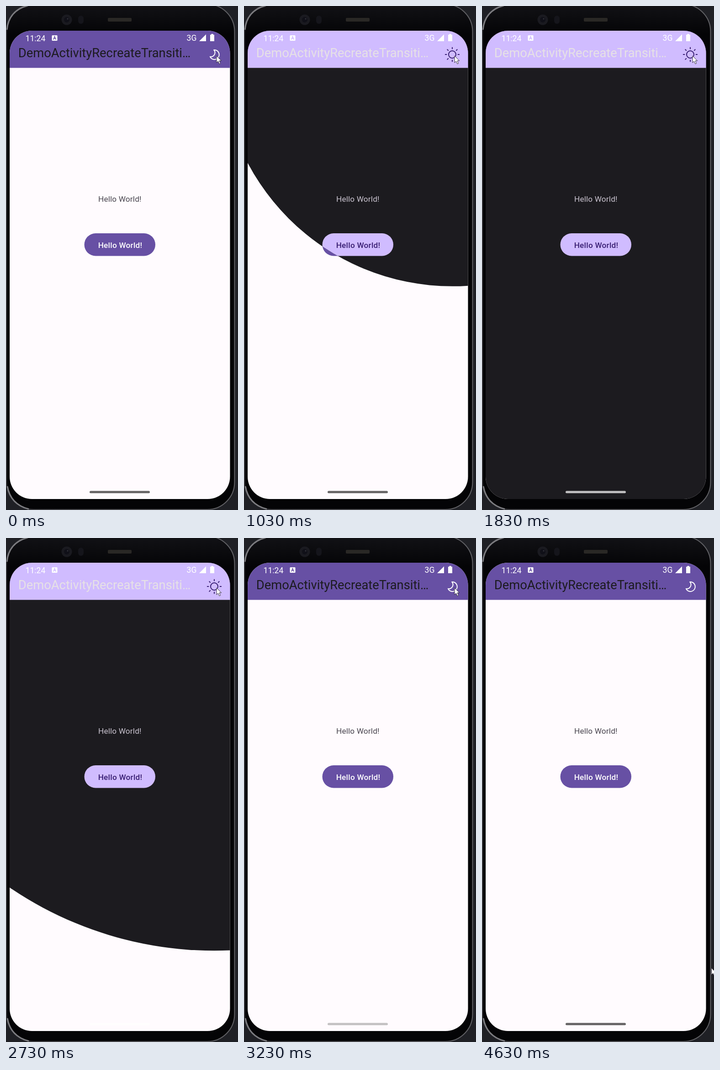
These frames come from a looping animation (508x1102 px, 4.66 s). An HTML page:

```html
<!DOCTYPE html>
<html lang="en">
<head>
<meta charset="utf-8">
<title>Theme reveal</title>
<style>
  html, body { margin: 0; width: 100%; height: 100%; overflow: hidden; background: #1f2025; }
  svg { display: block; width: 508px; height: 1102px; }
  text { font-family: Roboto, "Noto Sans", sans-serif; }
  .title { font-size: 27.33px; }
  .label { font-size: 17.2px; letter-spacing: .15px; text-anchor: middle; }
  .strong { font-weight: 500; letter-spacing: .25px; }
  .status { font-size: 17.6px; fill: #fff; }
</style>
</head>
<body>
<svg viewBox="0 0 508 1102">
  <defs>
    <linearGradient id="body" x2="0" y2="1">
      <stop offset="0" stop-color="#121216"/>
      <stop offset=".06" stop-color="#040406"/>
      <stop offset="1" stop-color="#040406"/>
    </linearGradient>
    <linearGradient id="rim">
      <stop offset="0" stop-color="#3c3c40"/>
      <stop offset="1" stop-color="#626266"/>
    </linearGradient>
    <clipPath id="screen"><rect x="8" y="54" width="482.5" height="1024" rx="49"/></clipPath>
    <clipPath id="reveal"><circle id="hole" cx="456" cy="106" r="0"/></clipPath>
  </defs>

  <rect width="508" height="1102" fill="#1f2025"/>
  <rect x="1" y="-4" width="499.5" height="1105" rx="60" fill="url(#body)" stroke="url(#rim)" stroke-width="2"/>
  <g fill="none" stroke="#7c7c80" stroke-width="3">
    <path d="M2 52Q6 10 48 -1"/>
    <path d="M3 1050Q10 1090 50 1100"/>
  </g>
  <circle cx="133" cy="30" r="11.5" fill="#1a1a20"/>
  <circle cx="133" cy="30" r="6" fill="#101018"/>
  <circle cx="135" cy="28" r="1.5" fill="#34343c"/>
  <rect x="158" y="21" width="12" height="18" rx="6" fill="#15151b"/>
  <rect x="223" y="26" width="52" height="8" rx="2" fill="#2a2825"/>

  <g clip-path="url(#screen)">
    <g id="light"></g>
    <g clip-path="url(#reveal)"><g id="dark"></g></g>
    <g class="status">
      <text x="42.5" y="76.5">11:24</text>
      <rect x="100.5" y="64" width="12" height="12" rx="1.5"/>
      <path id="glyph" d="M103.7 73.5L106.5 66.5L109.3 73.5M104.8 71.2H108.2" fill="none" stroke-width="1.5"/>
      <text x="395.5" y="76">3G</text>
      <path d="M438 62V77H423Z"/>
      <path d="M449.5 61H453.5V62.8H456V77H447V62.8H449.5Z"/>
    </g>
    <rect id="handle" x="183" y="1060.3" width="132" height="5" rx="2.5"/>
  </g>

  <path id="cursor" d="M0 0V15L3.5 11.8L6 17.6L8.6 16.5L6.1 10.8H10.6Z" fill="#fff" stroke="#25212f" stroke-width=".9"/>
</svg>
<script>
const LOOP = 4660;
const FULL = 1132;
const SPAN = 600;
const OPEN = 751, CLOSE = 2511;
const TINT_DARK = 1380, TINT_LIGHT = 3155, TINT_SPAN = 220;
const LEAVE = 4320, LEAVE_SPAN = 300;

const $ = id => document.getElementById(id);
const clamp = v => Math.min(1, Math.max(0, v));
const ease = v => (1 - Math.cos(Math.PI * clamp(v))) / 2;
const mix = (a, b, p) => a + (b - a) * p;

const moon = `<path d="M455.2 96A10.5 10.5 0 1 1 446.8 110.8A9 9 0 0 0 455.2 96Z"/>`;
const ray = (_, i) => `<path d="M456 93.5V90.8" transform="rotate(${i * 45} 456 106)"/>`;
const sun = `<circle cx="456" cy="106" r="8"/>` + Array.from({ length: 8 }, ray).join("");

const page = c => `
  <rect x="8" y="54" width="483" height="1024" fill="${c.back}"/>
  <rect x="8" y="54" width="483" height="81.3" fill="${c.main}"/>
  <text class="title" x="26.8" y="112" fill="${c.title}">DemoActivityRecreateTransiti…</text>
  <g fill="none" stroke="${c.onMain}" stroke-width="2" stroke-linecap="round" stroke-linejoin="round">${c.icon}</g>
  <text class="label" x="249.3" y="428" fill="${c.text}">Hello World!</text>
  <rect x="171.5" y="497" width="155.5" height="49.5" rx="24.75" fill="${c.main}"/>
  <text class="label strong" x="250" y="528.5" fill="${c.onMain}">Hello World!</text>`;

$("light").innerHTML = page({
  back: "#fffbfe", main: "#6750a4", onMain: "#ffffff", title: "#1c1b1f", text: "#49454f", icon: moon
});
$("dark").innerHTML = page({
  back: "#1c1b1f", main: "#d0bcff", onMain: "#381e72", title: "#e6e1e5", text: "#cac4d0", icon: sun
});

function draw(t) {
  const radius = FULL * (ease((t - OPEN) / SPAN) - ease((t - CLOSE) / SPAN));
  $("hole").setAttribute("r", Math.max(0, radius).toFixed(2));
  $("glyph").setAttribute("stroke", radius > 350 ? "#d0bcff" : "#6750a4");

  // The handle changes tint only after the reveal has settled.
  const tint = clamp((t - TINT_DARK) / TINT_SPAN) - clamp((t - TINT_LIGHT) / TINT_SPAN);
  const grey = Math.round(255 * tint);
  $("handle").setAttribute("fill", `rgba(${grey},${grey},${grey},${mix(.6, .72, tint)})`);

  const away = ease((t - LEAVE) / LEAVE_SPAN);
  $("cursor").setAttribute("transform", `translate(${mix(461, 502.3, away)} ${mix(109, 940, away)})`);
}

const start = performance.now();
function tick() {
  draw((performance.now() - start) % LOOP);
  requestAnimationFrame(tick);
}
tick();
</script>
</body>
</html>
```
